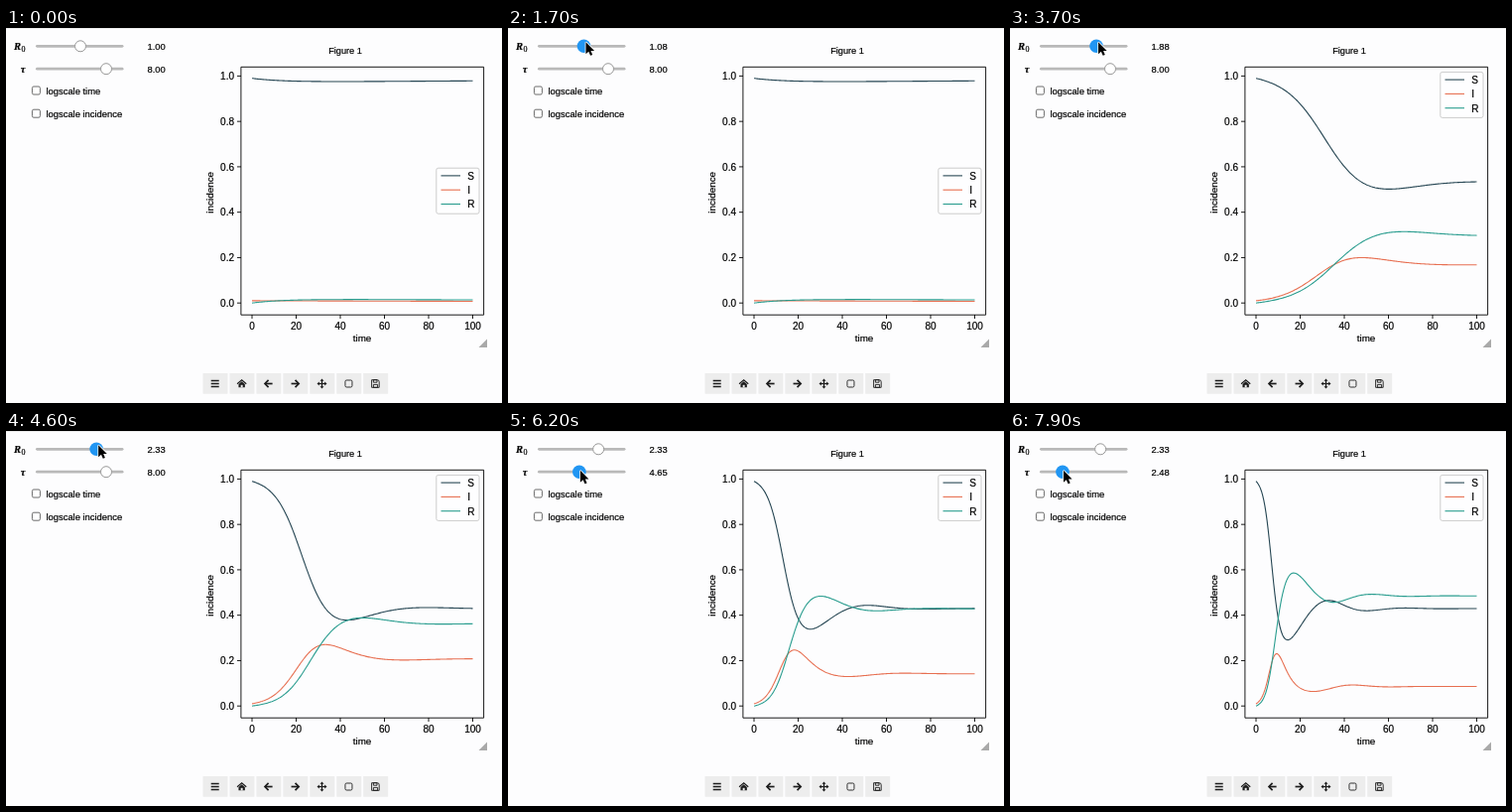
Animation of 500 by 378 pixels, one loop 8000 ms. Source, as an HTML page with a canvas:

```html
<!DOCTYPE html>
<html lang="en">
<head>
<meta charset="utf-8">
<title>SIRS explorer</title>
<style>
html, body { margin: 0; width: 100%; height: 100%; overflow: hidden; background: #fdfdfe; }
canvas { display: block; width: 500px; height: 378px; }
</style>
</head>
<body>
<canvas id="stage"></canvas>
<script>
const W = 500, H = 378, LOOP = 8000, STEP = 100;
const WANING = 14; // mean immunity time
const ENTER = 700, GRAB = 1300, LEAVE = 4600, SWITCH = 5000; // pointer timing
const ROW_R0 = 18.3, ROW_TAU = 41.2;
const PAPER = '#fdfdfe', INK = '#1c1c1c';
const SANS = '"Liberation Sans", Arial, sans-serif';
const SERIF = '"Liberation Serif", "Times New Roman", serif';
const SERIES = [['S', '#264653'], ['I', '#e76f51'], ['R', '#2a9d8f']];

// drag paths: [time, value]
const R0_DRAG = [[1600, 1], [1700, 1.08], [2600, 1.46], [2700, 1.46],
  [3600, 1.88], [3700, 1.88], [4500, 2.33]];
const TAU_DRAG = [[5200, 8], [5300, 7.62], [6100, 4.65], [6200, 4.65], [7800, 2.48]];

const canvas = document.getElementById('stage');
const ctx = canvas.getContext('2d');
const dpr = window.devicePixelRatio || 1;
canvas.width = W * dpr;
canvas.height = H * dpr;
ctx.scale(dpr, dpr);

const lerp = (a, b, k) => a + (b - a) * k;
const progress = (t, from, to) => Math.min(1, Math.max(0, (t - from) / (to - from)));

function follow(path, t) {
  return path.slice(1).reduce((value, [time, next], i) =>
    lerp(value, next, progress(t, path[i][0], time)), path[0][1]);
}

const paramsAt = t => ({ r0: follow(R0_DRAG, t), tau: follow(TAU_DRAG, t) });
const r0X = r0 => 75 + 44 * Math.log10(r0);
const tauX = tau => 31.4 + 8.7 * tau;

// SIRS model, fourth-order Runge-Kutta
function simulate({ r0, tau }) {
  const rate = ([s, i]) => {
    const infect = r0 / tau * s * i;
    return [-infect + (1 - s - i) / WANING, infect - i / tau];
  };
  const move = (y, d, h) => [y[0] + d[0] * h, y[1] + d[1] * h];
  const h = 0.5, rows = [];
  let y = [0.99, 0.01];
  for (let n = 0; n <= 200; n++) {
    rows.push([y[0], y[1], 1 - y[0] - y[1]]);
    const a = rate(y), b = rate(move(y, a, h / 2));
    const c = rate(move(y, b, h / 2)), d = rate(move(y, c, h));
    y = y.map((v, j) => v + h / 6 * (a[j] + 2 * b[j] + 2 * c[j] + d[j]));
  }
  return rows;
}

function text(str, x, y, size, align = 'left', font = SANS, style = '') {
  ctx.font = `${style} ${size}px ${font}`;
  ctx.textAlign = align;
  ctx.fillStyle = ctx.strokeStyle = '#000';
  ctx.lineWidth = 0.2;
  ctx.fillText(str, x, y);
  ctx.strokeText(str, x, y);
}

function trace(points) {
  ctx.beginPath();
  points.forEach(([x, y]) => ctx.lineTo(x, y));
}

function line(points, color, width) {
  trace(points);
  ctx.strokeStyle = color;
  ctx.lineWidth = width;
  ctx.stroke();
}

function polygon(points, color) {
  trace(points);
  ctx.fillStyle = color;
  ctx.fill();
}

function box(x, y, w, h, r, fill, stroke, width = 1) {
  ctx.beginPath();
  ctx.roundRect(x, y, w, h, r);
  if (fill) { ctx.fillStyle = fill; ctx.fill(); }
  if (stroke) { ctx.strokeStyle = stroke; ctx.lineWidth = width; ctx.stroke(); }
}

function at(x, y, angle, draw) {
  ctx.save();
  ctx.translate(x, y);
  ctx.rotate(angle);
  draw();
  ctx.restore();
}

function slider(y, x, value, active) {
  box(30, y - 1.4, 88.5, 2.8, 1.4, '#b9b9b9');
  const r = active ? 6.8 : 5.5;
  if (active) box(x - r, y - r, 2 * r, 2 * r, r, '#2196f3');
  else box(x - r, y - r, 2 * r, 2 * r, r, '#fff', '#999');
  text(value.toFixed(2), 142.5, y + 3.4, 9.4);
}

function checkbox(y, label) {
  box(26.4, y - 4, 8, 8, 1.5, '#fff', '#6c6c6c');
  text(label, 40.5, y + 4, 9.4);
}

function controls(t) {
  const { r0, tau } = paramsAt(t);
  text('R', 8, 21.9, 10.5, 'left', SERIF, 'italic bold');
  text('0', 15.4, 23.5, 8, 'left', SERIF);
  text('τ', 14.8, 44.7, 10.5, 'left', SERIF, 'italic bold');
  slider(ROW_R0, r0X(r0), r0, t >= 1000 && t < SWITCH);
  slider(ROW_TAU, tauX(tau), tau, t >= SWITCH);
  checkbox(63, 'logscale time');
  checkbox(86.2, 'logscale incidence');
}

const px = t => 248 + 2.225 * t;
const py = v => 277.2 - 228.8 * v;

function legend(top) {
  box(433.8, top, 43.2, 46, 2, 'rgba(255,255,255,0.8)', '#ccc');
  SERIES.forEach(([name, color], i) => {
    const y = top + 7.7 + i * 14.3;
    line([[438.5, y], [458, y]], color, 1.1);
    text(name, 465.3, y + 3.8, 10);
  });
}

function plot(params) {
  const rows = simulate(params);
  text('Figure 1', 342, 26, 9.2, 'center');
  SERIES.forEach(([, color], j) =>
    line(rows.map((row, n) => [px(n / 2), py(row[j])]), color, 1.1));

  box(236.9, 39.3, 244.7, 249.9, 0, null, '#000', 0.9);
  for (let i = 0; i <= 5; i++) {
    const x = px(i * 20), y = py(i / 5);
    line([[x, 289], [x, 293]], '#000', 0.9);
    line([[233, y], [237, y]], '#000', 0.9);
    text(String(i * 20), x, 303.6, 10, 'center');
    text((i / 5).toFixed(1), 230, y + 3.7, 10, 'right');
  }
  text('time', 359, 316.3, 9.8, 'center');
  at(209.1, 165.8, -Math.PI / 2, () => text('incidence', 0, 0, 9.9, 'center'));

  // the legend keeps clear of the S curve
  const blocked = rows.slice(166).some(row => row[0] > 0.815);
  legend(blocked ? 141.2 : 44.4);
  polygon([[476.5, 322], [485, 322], [485, 313.5]], '#a9a9a9');
}

function arrow() {
  line([[0, -3.6], [-3.6, 0], [0, 3.6]], INK, 1.7);
  line([[-3, 0], [4, 0]], INK, 1.7);
}

function spoke() {
  line([[0, 0], [0, -3.5]], INK, 1.3);
  polygon([[0, -5], [-2, -2.7], [2, -2.7]], INK);
}

const ICONS = [
  () => [-3, 0, 3].forEach(y => line([[-4, y], [4, y]], INK, 1.5)),
  () => {
    line([[-4.6, 0.3], [0, -3.6], [4.6, 0.3]], INK, 1.2);
    polygon([[-3.2, 0.4], [0, -2.3], [3.2, 0.4], [3.2, 3.8], [-3.2, 3.8]], INK);
    box(-1, 1.3, 2, 2.5, 0, '#ededed');
  },
  arrow,
  () => at(0, 0, Math.PI, arrow),
  () => [0, 1, 2, 3].forEach(i => at(0, 0, i * Math.PI / 2, spoke)),
  () => box(-3.5, -3.5, 7, 7, 1.4, null, INK, 0.9),
  () => {
    box(-3.8, -3.8, 7.6, 7.6, [0, 2, 0, 0], null, INK, 0.9);
    box(-2, 0.9, 4.2, 2.9, 0, null, INK, 0.9);
    box(-2, -3.8, 3.6, 2.5, 0, null, INK, 0.9);
  }
];

function toolbar() {
  ICONS.forEach((draw, i) => {
    const x = 198.5 + i * 26.95;
    box(x, 348, 25, 20.7, 0, '#ededed');
    at(x + 12.2, 358.5, 0, draw);
  });
}

function pointerAt(t) {
  const { r0, tau } = paramsAt(t);
  const enter = progress(t, ENTER, GRAB), change = progress(t, LEAVE, SWITCH);
  const x = lerp(r0X(r0) + 2, tauX(tau) + 1, change);
  return [lerp(66, x, enter), lerp(2, lerp(14.3, 39.8, change), enter)];
}

function pointer() {
  const shape = [[0, 0], [0, 12], [2.8, 9.5], [4.6, 13.5], [6.7, 12.6], [5, 8.8], [8.6, 8.6], [0, 0]];
  ctx.lineJoin = 'round';
  line(shape, '#fff', 1.6);
  ctx.lineJoin = 'miter';
  polygon(shape, '#000');
}

function render(time) {
  const t = Math.floor(time % LOOP / STEP) * STEP;
  box(0, 0, W, H, 0, PAPER);
  box(0, 0, W, 1, 0, '#f0f0f0');
  controls(t);
  plot(paramsAt(t - STEP)); // the curves trail the slider by one step
  toolbar();
  if (t >= ENTER) at(...pointerAt(t), 0, pointer);
}

const start = performance.now();
function tick() {
  render(performance.now() - start);
  requestAnimationFrame(tick);
}
tick();
</script>
</body>
</html>
```
